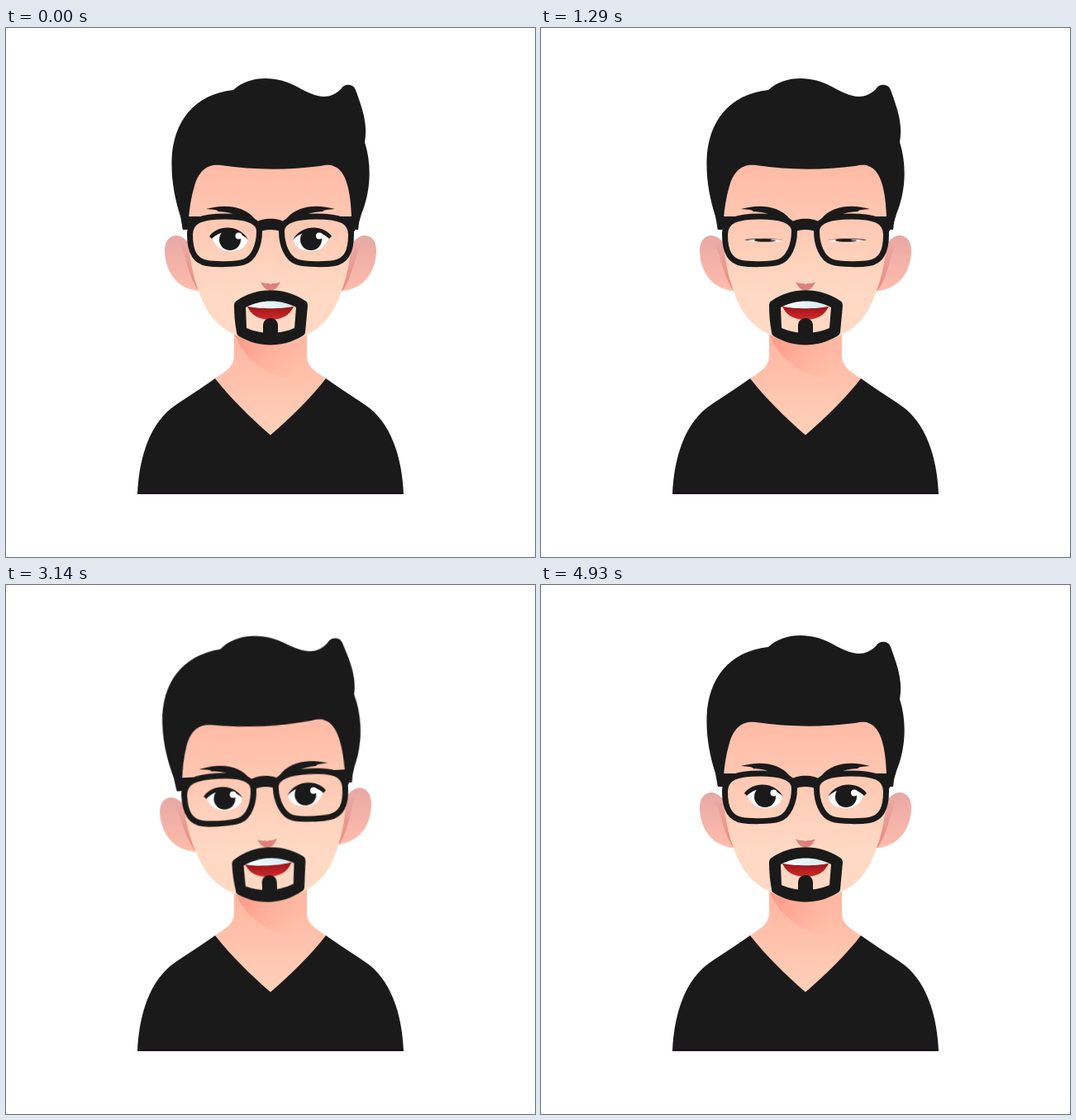
Animation of 640x640 px, one loop 5 s. Source, as an HTML page without scripts:

```html
<!DOCTYPE html>
<html lang="en">
<head>
<meta charset="utf-8">
<title>Man tilting his head</title>
<style>
  html, body { margin: 0; width: 100%; height: 100%; overflow: hidden; background: #fff; }
  svg { display: block; width: 100vw; height: 100vh; }
  .ink { fill: #1a1a1a; }
  .line { fill: none; stroke: #1a1a1a; }
  .head {
    transform-origin: 320px 387px;
    animation: tilt 5s cubic-bezier(.333, 0, .667, 1) infinite;
  }
  .eyes {
    transform-origin: 320px 257px;
    animation: blink 5s linear infinite;
  }
  @keyframes tilt {
    0%, 23.15%, 56.9%, 80.2%, 100% { transform: rotate(0deg); }
    11.43% { transform: rotate(5.7deg); }
    68.57% { transform: rotate(-5.7deg); }
  }
  @keyframes blink {
    0%, 23.2%, 28.2%, 37.5%, 42.5%, 78.2%, 83.9%, 93.2%, 98.2%, 100% { transform: scaleY(1); }
    25.7%, 40%, 80%, 81.43%, 95.7% { transform: scaleY(.1); }
  }
</style>
</head>
<body>
<svg viewBox="0 0 640 640">
  <defs>
    <linearGradient id="skin" x1="0" y1="165" x2="0" y2="320" gradientUnits="userSpaceOnUse">
      <stop offset="0" stop-color="#ffbaa5"/>
      <stop offset="1" stop-color="#ffd9c3"/>
    </linearGradient>
    <linearGradient id="neck" x1="0" y1="385" x2="0" y2="492" gradientUnits="userSpaceOnUse">
      <stop offset="0" stop-color="#ffb8a3"/>
      <stop offset="1" stop-color="#ffd0b9"/>
    </linearGradient>
    <linearGradient id="shade" x1="280" y1="385" x2="360" y2="412" gradientUnits="userSpaceOnUse">
      <stop offset="0" stop-color="#ff9b89"/>
      <stop offset="1" stop-color="#ffb8a3" stop-opacity="0"/>
    </linearGradient>
    <linearGradient id="ear" x1="0" y1="251" x2="0" y2="318" gradientUnits="userSpaceOnUse">
      <stop offset="0" stop-color="#e8a8a5"/>
      <stop offset="1" stop-color="#ffbcac"/>
    </linearGradient>
    <linearGradient id="fold" x1="0" y1="262" x2="0" y2="318" gradientUnits="userSpaceOnUse">
      <stop offset="0" stop-color="#e9a8a2"/>
      <stop offset="1" stop-color="#ea8b7e"/>
    </linearGradient>
    <linearGradient id="lip" x1="0" y1="337" x2="0" y2="353" gradientUnits="userSpaceOnUse">
      <stop offset="0" stop-color="#9c1519"/>
      <stop offset="1" stop-color="#d32a2c"/>
    </linearGradient>
    <linearGradient id="teeth" x1="294" y1="0" x2="346" y2="0" gradientUnits="userSpaceOnUse">
      <stop offset="0" stop-color="#f7fdfe"/>
      <stop offset="1" stop-color="#d3ebf1"/>
    </linearGradient>

    <!-- left half parts, mirrored for the right -->
    <g id="side-ear">
      <path fill="url(#ear)" d="M222 262C216 253 210 251 205 251C196 252 192 260 192 269C192 288 201 305 214 312C221 316 228 318 236 318Z"/>
      <path fill="url(#fold)" d="M211 263C218 276 220 300 233 318L240 318L220 258Z"/>
    </g>
    <g id="side-brow">
      <path class="ink" d="M242 219C262 213 288 214 301 231L292 232C280 226 268 222 256 222Q259 220 242 219Z"/>
      <path class="line" stroke-width="7" d="M222.500 250C222.500 233 236 228 265 228C292 228 306.500 233 306.500 246C306.500 262 300 279 288 283C277 286.500 252 286 243 284.500C228 282 222.500 270 222.500 250Z"/>
      <path class="ink" d="M212 228H238L223 244H214Z"/>
    </g>
    <g id="side-eye">
      <path fill="#fff" d="M249 253C257 243 280 241 292 256C291 265 283 270 271 270C260 270 253 264 249 253Z"/>
      <path class="ink" d="M246 252C256 238 282 237 293 256C281 244 261 243 249 255Z"/>
      <circle class="ink" cx="271" cy="256" r="13"/>
    </g>
  </defs>

  <path fill="url(#neck)" d="M276 355V397C276 410 265 416 250 426L320 496L390 426C375 416 364 410 364 397V355Z"/>
  <path fill="url(#shade)" d="M276 368C286 400 318 425 366 428L364 397V360Z"/>
  <path class="ink" d="M253 424C235 437 215 449 200 460C175 480 161 517 159 564H481C479 517 465 480 440 460C425 449 405 437 387 424C370 446 345 471 320 492.500C295 471 270 446 253 424Z"/>
  <path fill="#1c1020" d="M159 562H481V564H159Z"/>

  <g class="head">
    <use href="#side-ear"/>
    <use href="#side-ear" transform="matrix(-1 0 0 1 640 0)"/>
    <path fill="url(#skin)" d="M219 150H420V230C419 265 415 295 406 318C396 347 384 361 364 371C350 379 335 383 320 383C305 383 290 379 277 371C256 361 243 347 233 318C224 295 220 265 219 230Z"/>
    <path class="ink" d="M214 244L211 228C204 205 200 185 200.500 160C202 113 228 80 275 75C294 57 327 57 352 71C373 83 390 89 405 74C409 67 420 67 423 75C431 97 438 116 434 138C443 167 441 198 430 225C427 237 423 245 418 250V228C417 199 412 172 396 167C392 165 386 166 380 167C341 172 300 172 260 166C245 164 234 171 228 191C224 204 222 218 221 230Z"/>

    <g class="eyes">
      <use href="#side-eye"/>
      <use href="#side-eye" transform="matrix(-1 0 0 1 640 0)"/>
      <circle cx="281.500" cy="251.500" r="4" fill="#fff"/>
      <circle cx="379" cy="251.500" r="4" fill="#fff"/>
    </g>
    <use href="#side-brow"/>
    <use href="#side-brow" transform="matrix(-1 0 0 1 640 0)"/>
    <path class="ink" d="M301 236C310 229 330 229 339 236L334 247C326 243 314 243 306 247Z"/>

    <path fill="#de817b" d="M308 307C313 310 317 308 320 310C323 308 327 310 332 307C329 314 325 317.500 320 317.500C315 317.500 311 314 308 307Z"/>

    <path fill="url(#lip)" d="M292 337H348C343 348 333 353 320 353C307 353 297 348 292 337Z"/>
    <path fill="url(#teeth)" d="M293 337C308 328 332 328 347 337C334 340 306 340 293 337Z"/>
    <path class="ink" fill-rule="evenodd" d="M276 336C276 333 277 331 279 330C303 313 337 313 362 330C364 331 365 333 365 336L362 368C362 370 360 372 358 373C334 387 306 387 282 373C280 372 279 370 279 368C277 358 276 347 276 336ZM290 338L291 363C310 371 330 371 349 363L351 338C333 328 308 328 290 338Z"/>
    <path class="ink" d="M311 376V360C311 348 329 348 329 360V376Z"/>
  </g>
</svg>
</body>
</html>
```
